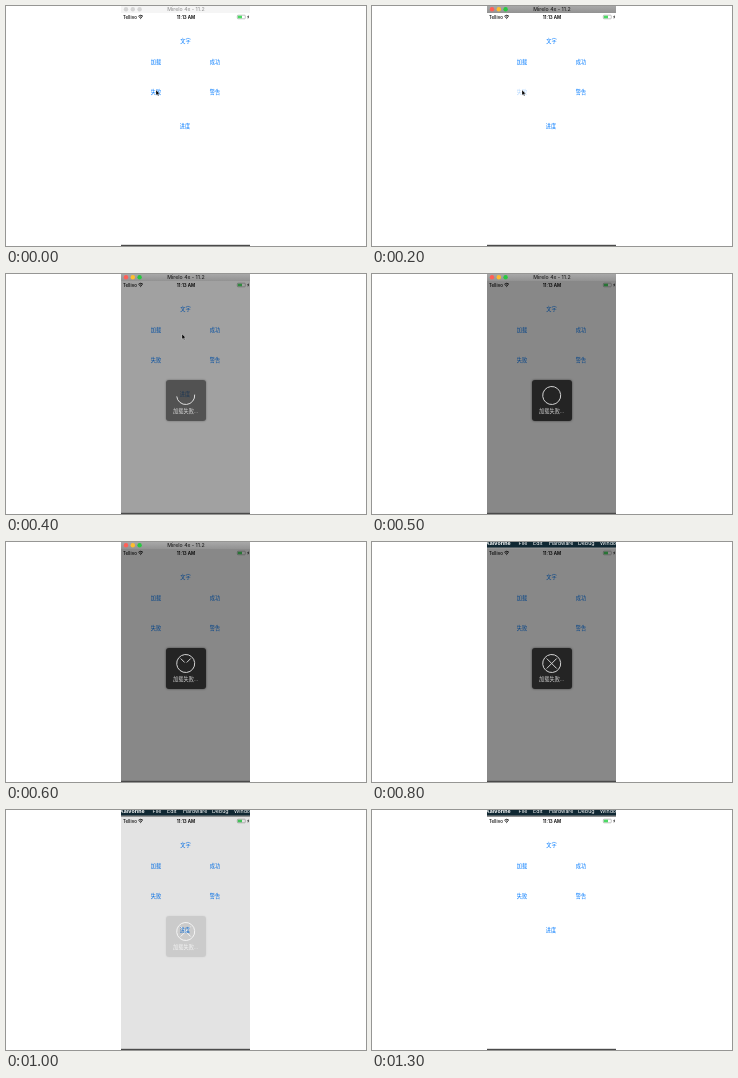
Animation of 360 by 240 pixels, one loop 1400 ms. Source, as an HTML page:

```html
<!DOCTYPE html>
<html>
<head>
<meta charset="utf-8">
<style>
html, body { margin: 0; width: 100%; height: 100%; overflow: hidden; background: #fff; }
svg { display: block; width: 360px; height: 240px; }
text { font-family: Inter, "Noto Sans CJK SC", "Noto Sans CJK", sans-serif; font-size: 5.2px; }
.mid text, text.mid { text-anchor: middle; }
#buttons { fill: #007aff; font-weight: 500; }
#status text { font-size: 4.5px; font-weight: 500; }
#title text { font-weight: 500; }
#menu text { font-size: 5.3px; fill: #fff; }
#mark { fill: none; stroke: #d2d2d2; stroke-width: 1; }
</style>
</head>
<body>
<svg viewBox="0 0 360 240">
  <defs>
    <clipPath id="win"><rect x="115" width="129" height="240"/></clipPath>
    <filter id="soft" x="-20%" y="-20%" width="140%" height="140%"><feGaussianBlur stdDeviation="1.3"/></filter>
    <linearGradient id="metal" x2="0" y2="1">
      <stop stop-color="#a8a8a8"/><stop offset="1" stop-color="#929292"/>
    </linearGradient>
  </defs>
  <g clip-path="url(#win)">
    <g id="buttons" class="mid">
      <text x="179.5" y="37">文字</text>
      <text x="150" y="57.8">加载</text>
      <text x="209" y="57.8">成功</text>
      <text id="fail" x="150" y="87.6">失败</text>
      <text x="209" y="87.6">警告</text>
      <text x="179" y="122">进度</text>
    </g>
    <g id="status">
      <text x="117" y="12.6">Tellivo</text>
      <path d="M132.4 10.3Q134.7 8.2 137 10.3M133.4 11.5Q134.7 10.4 136 11.5M134.3 12.6h.8" fill="none" stroke="#000" stroke-width=".9"/>
      <text class="mid" x="180" y="12.6" style="font-weight:600">11:13 AM</text>
      <rect x="231.3" y="9.2" width="8" height="3.6" rx=".8" fill="none" stroke="#888" stroke-width=".5"/>
      <rect x="231.8" y="9.7" width="4.2" height="2.6" fill="#4cd964"/>
      <path d="M242.4 8.9l-1.2 2.3h.9l-.4 2 1.4-2.6h-.9z"/>
    </g>
    <g id="hud">
      <rect x="115" y="7" width="129" height="232" opacity=".467"/>
      <rect x="160" y="106" width="40" height="41" rx="3" opacity=".5" filter="url(#soft)"/>
      <rect x="160" y="106" width="40" height="41" rx="3" fill="#242424"/>
      <path id="mark"/>
      <text class="mid" x="179.7" y="138.8" fill="#d2d2d2">加载失败...</text>
    </g>
    <rect id="bar" x="115" width="129" height="7"/>
    <g id="title">
      <circle cx="120" cy="3.3" r="2.2"/>
      <circle cx="126.8" cy="3.3" r="2.2"/>
      <circle cx="133.6" cy="3.3" r="2.2"/>
      <text class="mid" x="180" y="5.2">Mirelo 4x - 11.2</text>
    </g>
    <g id="menu">
      <rect x="115" width="129" height="5.5" fill="#102833"/>
      <text x="114" y="3.4" font-weight="700">Kalvorine</text>
      <text x="146.5" y="3.4">File</text>
      <text x="161" y="3.4">Edit</text>
      <text x="177" y="3.4">Hardware</text>
      <text x="206" y="3.4">Debug</text>
      <text x="228" y="3.4">Window</text>
    </g>
    <rect x="115" y="238.8" width="129" height="1.2" fill="#4a4a4a"/>
    <path id="cursor" d="M0 0V5.2L1.2 4.1 2 6 2.9 5.6 2.1 3.8H3.7Z" stroke="#fff" stroke-width=".3"/>
  </g>
</svg>
<script>
const $ = id => document.getElementById(id);
const STEP = 100, STEPS = 14;
const fade = [0, 0, 0, .08, .79, 1, 1, 1, 1, .65, .23, .03, 0, 0];
const lights = ['#ff5f57', '#ffbd2e', '#28c840'];
const clamp = v => Math.max(0, Math.min(1, v));
const show = (id, on) => $(id).setAttribute('visibility', on ? 'visible' : 'hidden');

// Ring sweeps clockwise first, then both cross strokes grow.
function markPath(sweep, cross) {
  if (!sweep) return '';
  const cx = 179.7, cy = 121.5, r = 9, start = -.1;
  const at = a => `${cx + r * Math.cos(a)} ${cy + r * Math.sin(a)}`;
  const end = start + sweep * 2 * Math.PI, mid = (start + end) / 2;
  const ring = `M${at(start)}A${r} ${r} 0 0 1 ${at(mid)}A${r} ${r} 0 0 1 ${at(end)}`;
  const l = 10 * cross;
  return cross ? `${ring}M${cx - 5} ${cy - 5}l${l} ${l}M${cx + 5} ${cy - 5}l${-l} ${l}` : ring;
}

function draw(now) {
  const k = Math.floor(now / STEP) % STEPS, active = k > 0, menu = k >= 7;
  $('hud').setAttribute('opacity', fade[k]);
  $('mark').setAttribute('d', markPath(clamp((k - 3) / 2), clamp((k - 5) / 2.5)));
  $('fail').setAttribute('opacity', k === 2 || k === 3 ? .3 : 1);
  $('bar').setAttribute('fill', active ? 'url(#metal)' : '#f5f5f5');
  $('title').setAttribute('fill', active ? '#222' : '#999');
  $('title').querySelectorAll('circle').forEach((c, i) =>
    c.setAttribute('fill', active ? lights[i] : '#d4d4d4'));
  show('title', !menu);
  show('menu', menu);
  show('cursor', k < 5);
  $('cursor').setAttribute('transform', k < 4 ? 'translate(150 84)' : 'translate(176 60)');
  requestAnimationFrame(draw);
}
draw(0);
</script>
</body>
</html>
```
